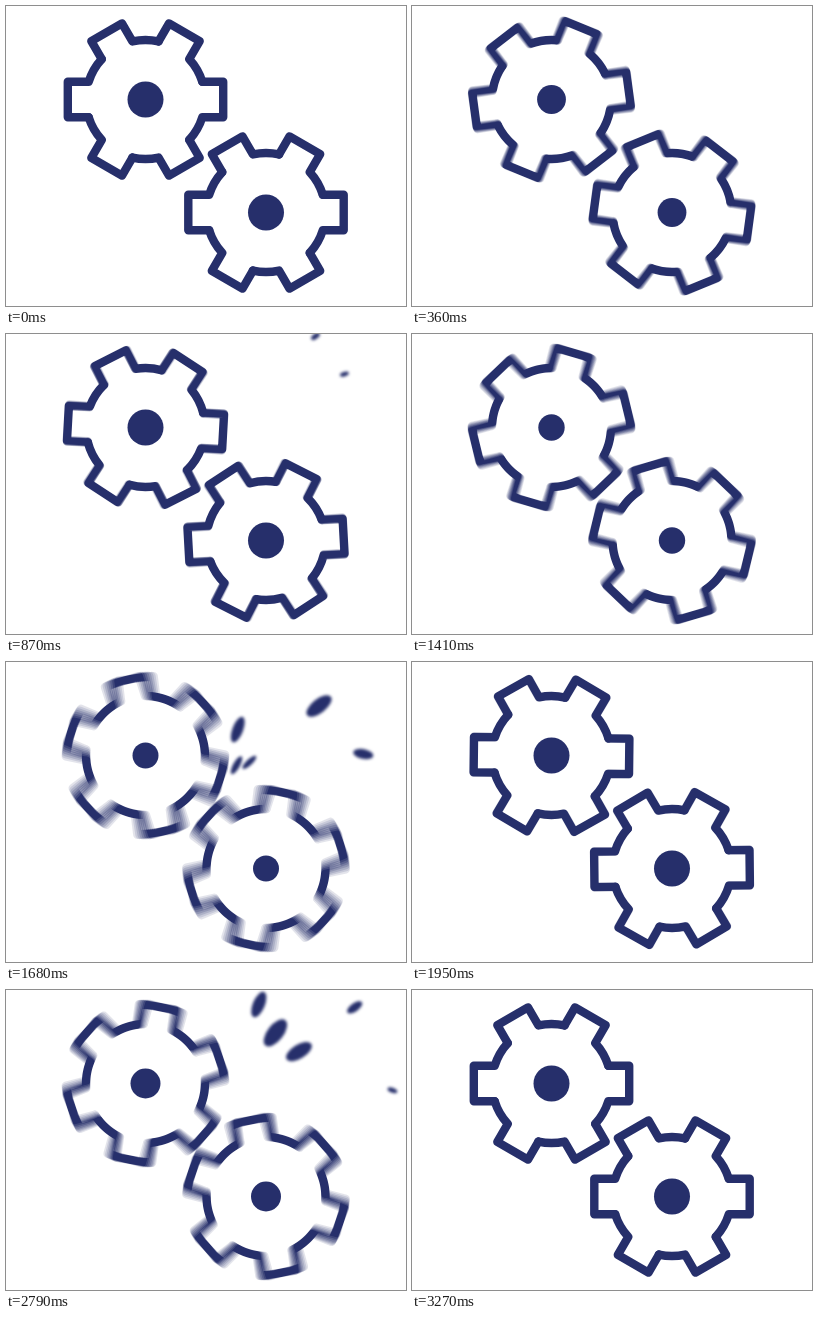
Write an HTML page without scripts that moves like this. It is 400 by 300 pixels and loops after 3.63 s.

```html
<!DOCTYPE html>
<html lang="en">
<head>
<meta charset="utf-8">
<title>Gears</title>
<style>
  @property --n { syntax: "<number>"; inherits: true; initial-value: 0; }

  html, body { margin: 0; width: 100%; height: 100%; overflow: hidden; background: #fff; }

  /* --n counts 30 ms ticks, --k counts ticks since the current spin began */
  svg {
    display: block; width: 100%; height: 100%;
    fill: #262f6b;
    animation: tick 3630ms steps(121) -4ms infinite;
    --k: calc(var(--n) - 9 - 34 * clamp(0, var(--n) - 39, 1) - 35 * clamp(0, var(--n) - 74, 1));
  }
  @keyframes tick { from { --n: 0; } to { --n: 121; } }

  /* Eight sub-tick exposures averaged into motion blur */
  .pass {
    opacity: calc(1 / var(--i));
    --q: calc(var(--k) + (var(--i) - 4.5) / 13);
    --phase: clamp(0, 6.85 * var(--q)
      + 1.65 * max(0, var(--q) - 4)
      + 1.7 * max(0, var(--q) - 9)
      - 3 * max(0, var(--q) - 15)
      - 3.7 * max(0, var(--q) - 20), 180);
    --turn: calc(120deg * (1 - cos(1deg * var(--phase))));
  }
  .pass rect { width: 400px; height: 300px; fill: #fff; }
  .a { transform: translate(139.5px, 93.5px) rotate(calc(-1 * var(--turn))); }
  .b { transform: translate(260px, 206.5px) rotate(var(--turn)); }

  .hub { r: calc(1px * min(18, max(18 - 1.2 * var(--k), 11.6, var(--k)))); }

  /* --at: birth tick, --life: ticks alive, --w and --h: full size, --drag: slowdown */
  .drops { filter: blur(1.5px); --drag: 2; }
  .drops ellipse {
    --u: clamp(0, (var(--k) - var(--at)) / var(--life), 1);
    offset-distance: calc(100% * (1 - pow(1 - var(--u), var(--drag))));
    offset-rotate: auto;
    rx: calc(.5px * var(--w) * min(6 * var(--u), 1, 2 - 2 * var(--u)));
    ry: calc(.5px * var(--h) * min(4 * var(--u), 1, 2 - 2 * var(--u)));
  }
  .d1 { --at: 8; --life: 9; --w: 23; --h: 11; offset-path: path("M200 125Q300 64 396 104"); }
  .d2 { --at: 9; --life: 8.5; --w: 30; --h: 14; offset-path: path("M190 155Q282 62 365 6"); }
  .d3 { --at: 11; --life: 9; --w: 27; --h: 12; offset-path: path("M207 139Q228 70 276 -40"); }
  .d4 { --at: 12; --life: 9.5; --w: 32; --h: 16; --drag: 3; offset-path: path("M207 149Q260 38 310 2"); }
  .d5 { --at: 12; --life: 9.5; --w: 29; --h: 14; --drag: 3; offset-path: path("M212 133Q276 60 339 40"); }
</style>
</head>
<body>
<svg viewBox="0 0 400 300">
  <defs>
    <path id="tooth" d="M56.8-17.7H77.7V17.7H56.8A59.5 59.5 0 0 1 43.73 40.34"/>
    <g id="gear" fill="none" stroke="#262f6b" stroke-width="8.4" stroke-linecap="round" stroke-linejoin="round">
      <use href="#tooth"/>
      <use href="#tooth" transform="rotate(60)"/>
      <use href="#tooth" transform="rotate(120)"/>
      <use href="#tooth" transform="rotate(180)"/>
      <use href="#tooth" transform="rotate(240)"/>
      <use href="#tooth" transform="rotate(300)"/>
    </g>
  </defs>

  <g class="pass" style="--i:1"><rect/><use class="a" href="#gear"/><use class="b" href="#gear"/></g>
  <g class="pass" style="--i:2"><rect/><use class="a" href="#gear"/><use class="b" href="#gear"/></g>
  <g class="pass" style="--i:3"><rect/><use class="a" href="#gear"/><use class="b" href="#gear"/></g>
  <g class="pass" style="--i:4"><rect/><use class="a" href="#gear"/><use class="b" href="#gear"/></g>
  <g class="pass" style="--i:5"><rect/><use class="a" href="#gear"/><use class="b" href="#gear"/></g>
  <g class="pass" style="--i:6"><rect/><use class="a" href="#gear"/><use class="b" href="#gear"/></g>
  <g class="pass" style="--i:7"><rect/><use class="a" href="#gear"/><use class="b" href="#gear"/></g>
  <g class="pass" style="--i:8"><rect/><use class="a" href="#gear"/><use class="b" href="#gear"/></g>

  <circle class="hub" cx="139.5" cy="93.5"/>
  <circle class="hub" cx="260" cy="206.5"/>

  <g class="drops">
    <ellipse class="d1"/>
    <ellipse class="d2"/>
    <ellipse class="d3"/>
    <ellipse class="d4"/>
    <ellipse class="d5"/>
  </g>
</svg>
</body>
</html>
```
